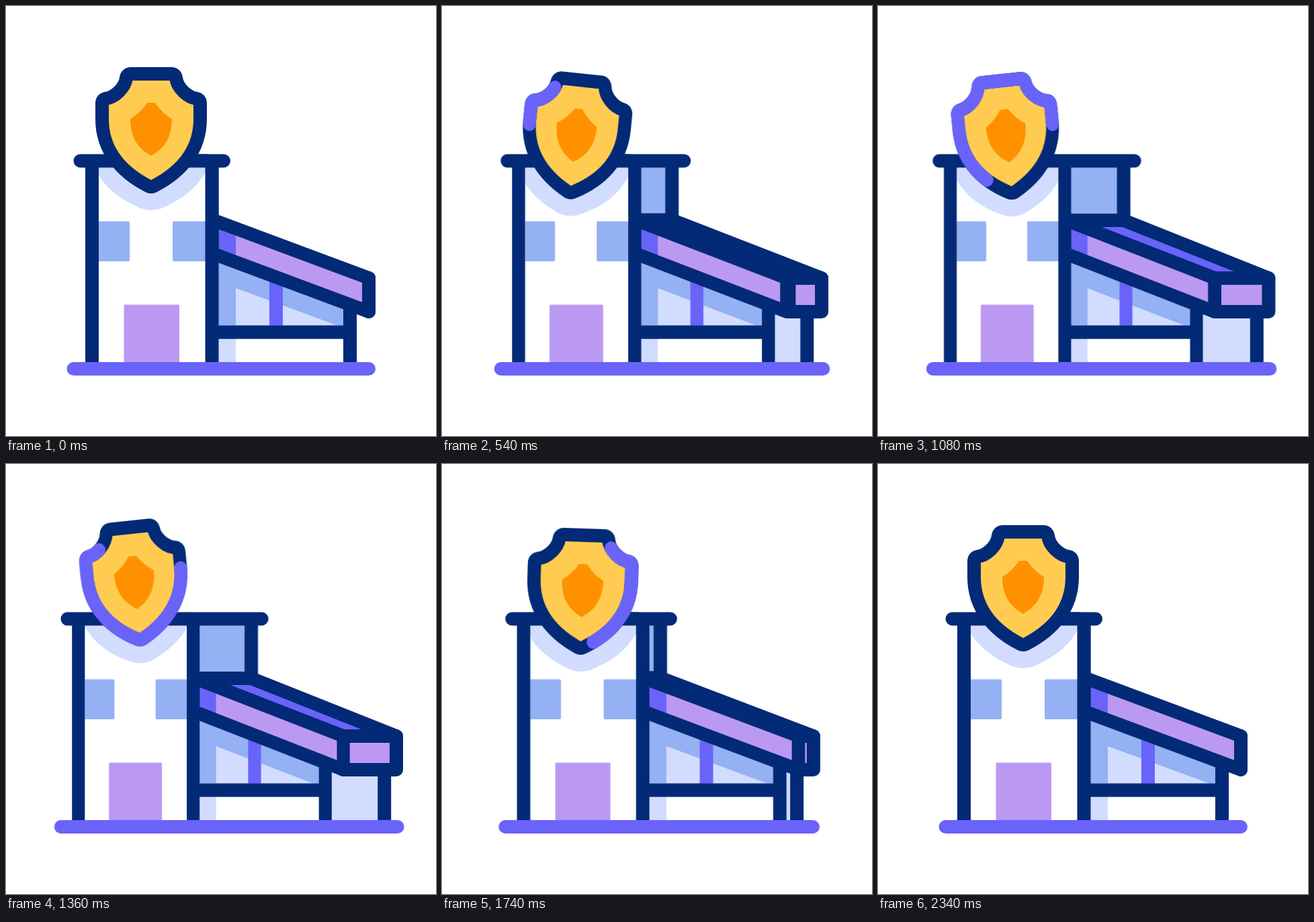
Write an HTML page without scripts that moves like this. It is 640 px wide and 640 px high and loops after 2.72 s.

```html
<!DOCTYPE html>
<html lang="en">
<head>
<meta charset="utf-8">
<title>Guarded building</title>
<style>
  html, body { margin: 0; width: 100%; height: 100%; overflow: hidden; background: #fff; }
  svg { display: block; width: 100vw; height: 100vh; }
  svg * { animation: 2720ms linear infinite; }

  .navy { fill: none; stroke: #032a76; stroke-width: 20; stroke-linejoin: round; }
  .violet { fill: none; stroke: #6963fa; stroke-width: 20; }
  .round { stroke-linecap: round; }
  .blue { fill: #93b1f3; }
  .pale { fill: #d2dcfe; }
  .lilac { fill: #bb99f2; }
  .purple { fill: #6963fa; }
  .white { fill: #fff; }

  .shift { animation-name: shift; }
  .squash { animation-name: squash; transform-origin: 128px 0; }
  .back { animation-name: back; }
  .reach { animation-name: reach; }
  .deck { animation-name: deck; }
  .end { animation-name: end; }
  .sway { animation-name: bob, tilt; transform-origin: 216px 185px; }
  .glint { animation-name: run, show; animation-timing-function: linear, step-end; }

  /* turning out, then back to the flat front view */
  @keyframes shift {
    0%, 5.15%, 75%, to { transform: none; animation-timing-function: cubic-bezier(.08,.35,.45,1); }
    45.59% { transform: translateX(-20.7px); animation-timing-function: cubic-bezier(.65,0,.48,1); }
  }
  @keyframes squash {
    0%, 5.15%, 75%, to { transform: none; animation-timing-function: cubic-bezier(.08,.35,.45,1); }
    45.59% { transform: scaleX(.9535); animation-timing-function: cubic-bezier(.35,0,.35,1); }
  }
  @keyframes back {
    0%, 5.15%, 75%, to { transform: none; animation-timing-function: cubic-bezier(.25,0,.25,1); }
    45.59% { transform: translateX(var(--dx)); animation-timing-function: cubic-bezier(.6,0,.5,1); }
  }
  @keyframes reach {
    0%, 5.15%, 75%, to { transform: none; animation-timing-function: cubic-bezier(.2,.1,.3,1); }
    45.59% { transform: translateX(var(--dx)); animation-timing-function: cubic-bezier(.52,0,.5,1); }
  }
  @keyframes deck {
    0%, 5.15%, 75%, to { d: path("M306.5 318H306.5L540 405H540Z"); animation-timing-function: cubic-bezier(.25,0,.25,1); }
    45.59% { d: path("M277.8 319H366.5L582 405H500.5Z"); animation-timing-function: cubic-bezier(.6,0,.5,1); }
  }
  @keyframes end {
    0%, 5.15%, 75%, to { d: path("M540 405H540V455H540Z"); animation-timing-function: cubic-bezier(.25,0,.25,1); }
    45.59% { d: path("M500.5 405H582V455H500.5Z"); animation-timing-function: cubic-bezier(.6,0,.5,1); }
  }

  /* shield */
  @keyframes bob {
    0%, 5.15%, 86.03%, to { translate: 0 0; animation-timing-function: ease-in-out; }
    18.38% { translate: 0 10px; animation-timing-function: ease-in-out; }
    28.31% { translate: 0 -11px; animation-timing-function: ease-in-out; }
    38.6% { translate: 0 10px; animation-timing-function: ease-in-out; }
    52.21% { translate: 0 -8px; animation-timing-function: ease-in-out; }
    63.24% { translate: 0 5px; animation-timing-function: ease-in-out; }
    71.32% { translate: 0 3px; animation-timing-function: ease-in-out; }
  }
  @keyframes tilt {
    0%, 5.15%, 86.03%, to { rotate: 0deg; animation-timing-function: ease-in-out; }
    18.38% { rotate: 6deg; animation-timing-function: ease-in-out; }
    41.18% { rotate: -6deg; animation-timing-function: ease-in-out; }
    47.79% { rotate: -6deg; animation-timing-function: ease-in-out; }
    70.96% { rotate: 3.7deg; animation-timing-function: ease-in-out; }
  }
  @keyframes run {
    0%, 5.15% { stroke-dasharray: 0 100; stroke-dashoffset: -20; }
    12.5% { stroke-dasharray: 3 97; stroke-dashoffset: -21; }
    19.85% { stroke-dasharray: 15 85; stroke-dashoffset: -25; }
    25.74% { stroke-dasharray: 32 68; stroke-dashoffset: -39; }
    31.62% { stroke-dasharray: 51 49; stroke-dashoffset: -58; }
    39.7% { stroke-dasharray: 66 34; stroke-dashoffset: -108.5; }
    48.9% { stroke-dasharray: 64 36; stroke-dashoffset: -167; }
    58.09% { stroke-dasharray: 54.5 45.5; stroke-dashoffset: -222.5; }
    64.71% { stroke-dasharray: 33 67; stroke-dashoffset: -265; }
    71.32% { stroke-dasharray: 10 90; stroke-dashoffset: -301; }
    78.68% { stroke-dasharray: 3 97; stroke-dashoffset: -315; }
    86.03%, to { stroke-dasharray: 0 100; stroke-dashoffset: -320; }
  }
  @keyframes show {
    0%, 85.9%, to { visibility: hidden; }
    5.7% { visibility: visible; }
  }
</style>
</head>
<body>
<svg viewBox="0 0 640 640">
  <defs>
    <clipPath id="facade"><path d="M138 240H297V530H138Z"/></clipPath>
    <clipPath id="fascia"><path d="M306.5 318L540 405V455L306.5 368Z"/></clipPath>
    <path id="outline" pathLength="100" d="M216 269Q213 269 210 267C172 247 143 215 143 168V145Q143 139 148 138C162 136 177 122 179 107Q180 101 186 101H246Q252 101 253 107C255 122 270 136 284 138Q289 139 289 145V168C289 215 260 247 222 267Q219 269 216 269Z"/>
  </defs>

  <!-- side walls -->
  <g class="back" style="--dx:60px">
    <path class="blue" d="M206 230H306.5V320H206Z"/>
    <path class="navy" d="M306.5 230V320"/>
  </g>
  <g class="back" style="--dx:52.5px">
    <path class="pale" d="M412 455H512V540H412Z"/>
    <path class="navy" d="M512 455V540"/>
  </g>
  <path class="navy round reach" style="--dx:58.5px" d="M216 230.5H324"/>
  <path class="navy purple deck" style="fill:#6963fa" d="M306.5 318H306.5L540 405H540Z"/>
  <path class="navy end" style="fill:#bb99f2" d="M540 405H540V455H540Z"/>

  <g class="shift"><g class="squash">
    <!-- wing -->
    <path class="white" d="M306.5 368L512 445V540H306.5Z"/>
    <path class="blue" d="M306.5 368L512 445V485H306.5Z"/>
    <path class="pale" d="M342 420L492 475H342ZM316 490H342V535H316Z"/>
    <path class="purple" d="M392 395H412V480H392Z"/>
    <path class="navy" d="M306.5 485.5H512M512 445V540"/>
    <g clip-path="url(#fascia)">
      <path class="lilac" d="M306 310H550V465H306Z"/>
      <path class="purple" d="M306 310H342V465H306Z"/>
    </g>
    <path class="navy" d="M306.5 318L540 405V455L306.5 368Z"/>

    <!-- tower -->
    <path class="white" d="M128 230H306.5V540H128Z"/>
    <g clip-path="url(#facade)">
      <path class="pale sway" d="M120 205C132 268 172 288 200 301Q216 307 232 301C260 288 300 268 312 205Z"/>
      <rect class="blue" x="130" y="320.5" width="54" height="59.5" rx="2"/>
      <rect class="blue" x="248" y="320.5" width="54" height="59.5" rx="2"/>
      <rect class="lilac" x="175.5" y="444.5" width="82.5" height="92" rx="2"/>
    </g>
    <path class="navy" d="M128 230V540M306.5 230V540"/>
    <path class="navy round" d="M110.5 230.5H300"/>

    <g class="sway">
      <use href="#outline" class="navy" style="fill:#ffcc51"/>
      <path fill="#ff9101" d="M210 144H222Q232 159 247 168C247 195 236 212 216 223C196 212 185 195 185 168Q200 159 210 144Z"/>
      <use href="#outline" class="violet round glint"/>
    </g>
    <path class="violet round" d="M100.5 540H400"/>
  </g></g>
  <path class="violet round reach" style="--dx:44px" d="M300 540H540"/>
</svg>
</body>
</html>
```
